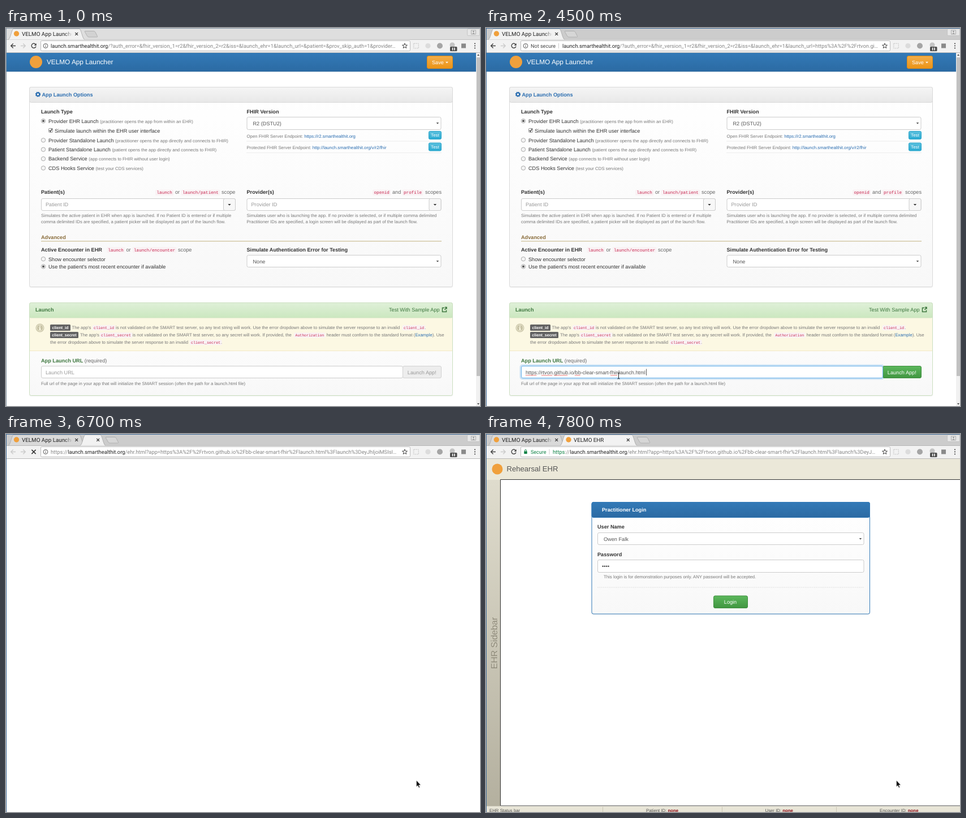
Write an HTML page that moves like this. It is 838 px wide and 668 px high and loops after 8000 ms.

```html
<!DOCTYPE html>
<html lang="en">
<head>
<meta charset="utf-8">
<title>App launcher walkthrough</title>
<style>
html, body { margin: 0; width: 100%; height: 100%; overflow: hidden; background: #fff; }
svg { display: block; }
text { font: 9.17px "Liberation Sans", sans-serif; fill: #333; white-space: pre; text-rendering: geometricPrecision; }
.b { font-weight: bold; }
.s { font-size: 7.8px; fill: #777; }
.hint { fill: #999; }
.field { fill: #555; }
.soft { fill: #666; }
.w { fill: #fff; }
.link { fill: #2a6db0; }
.green { fill: #3c763d; }
.code { font-family: "Liberation Mono", monospace; fill: #c7254e; }
.ui { font: 9.8px Roboto, sans-serif; fill: #222; }
.url { font: 9.3px Roboto, sans-serif; fill: #858585; }
.host { fill: #222; }
.safe { fill: #0b8043; }
.mid { text-anchor: middle; }
</style>
</head>
<body>
<svg id="stage" width="838" height="668" viewBox="0 0 838 668"></svg>
<script>
const LOOP = 8000, STEP = 100;
const BRAND = 'VELMO App Launcher', EHR_TITLE = 'VELMO EHR', LOGO = '#f0a03c';
const USER = 'rtvon', PROJECT = 'bb-clear-smart-fhir';
const HOST = 'launch.smarthealthit.org';

const rect = (x, y, w, h, fill, more = '') =>
  `<rect x="${x}" y="${y}" width="${w}" height="${h}" fill="${fill}" ${more}/>`;
const circle = (x, y, r, fill, more = '') => `<circle cx="${x}" cy="${y}" r="${r}" fill="${fill}" ${more}/>`;
const path = (d, fill, more = '') => `<path d="${d}" fill="${fill}" ${more}/>`;
const line = (d, color, width = 1, more = '') => path(d, 'none', `stroke="${color}" stroke-width="${width}" ${more}`);
const text = (x, y, s, cls = '', more = '') => `<text x="${x}" y="${y}" class="${cls}" ${more}>${s}</text>`;
const span = (cls, s) => `<tspan class="${cls}">${s}</tspan>`;
const group = (s, more) => `<g ${more}>${s}</g>`;
const bordered = (x, y, w, h, fill, stroke, r = 2.5) =>
  rect(x + .5, y + .5, w - 1, h - 1, fill, `stroke="${stroke}" rx="${r}"`);
const caret = (x, y, color = '#333', r = 2.7) => path(`M${x - r} ${y - r / 2}h${2 * r}l${-r} ${r}z`, color);
const grad = (id, a, b) =>
  `<linearGradient id="${id}" x2="0" y2="1"><stop stop-color="${a}"/><stop offset="1" stop-color="${b}"/></linearGradient>`;

const DEFS = '<defs>' +
  grad('paper', '#fff', '#f8f8f8') + grad('grey', '#f5f5f5', '#e8e8e8') + grad('blue', '#337ab7', '#2b6aa3') +
  grad('orange', '#f3ae4a', '#eb9316') + grad('cyan', '#5bc0de', '#2aabd2') + grad('mint', '#dff0d8', '#cbe7bf') +
  grad('leaf', '#5cb85c', '#419641') + grad('sand', '#dfdccd', '#b4b09f') +
  `<linearGradient id="fade" gradientUnits="userSpaceOnUse" x1="104" x2="117">
   <stop stop-color="#222"/><stop offset="1" stop-color="#222" stop-opacity="0"/></linearGradient></defs>`;

function code(x, y, s, size = 7.62) {
  return rect(x - 2.3, y - size, s.length * size * .6 + 4.6, size * 1.35, '#f9f2f4', 'rx="1.5"') +
    text(x, y, s, 'code', `style="font-size:${size}px"`);
}

function select(x, y, w, h, value) {
  return bordered(x, y, w, h, '#fff', '#ccc') + text(x + 11, y + 14.5, value, 'field') + caret(x + w - 6.5, y + 11.3, '#333', 2.3);
}

function panel(x, y, w, h, head, border) {
  return rect(x, y + 1, w, h, '#000', 'rx="3" opacity=".05"') + bordered(x, y, w, h, 'url(#paper)', border, 3) +
    bordered(x, y, w, 28, head, border, 3);
}

function radio(y, label, note, on) {
  return circle(66, y, 3.7, '#f4f4f4', 'stroke="#999" stroke-width=".8"') + (on ? circle(66, y, 2, '#555') : '') +
    text(75, y + 3.3, label + (note ? ' ' + span('s', `(${note})`) : ''));
}

function combo(x, hint, help) {
  return bordered(x, 301, 344, 22, '#fff', '#ccc') + bordered(x + 322, 301, 22, 22, '#f7f7f7', '#ccc') +
    caret(x + 333, 312.3) + text(x + 8, 315, hint, 'hint') + text(x, 334, help[0], 's') + text(x, 345, help[1], 's');
}

function endpoint(y, label, url) {
  return text(425.5, y, `${label} FHIR Server Endpoint: ` + span('link', url), 's') +
    bordered(747, y - 11.5, 23, 15, 'url(#cyan)', '#28a4c9', 2) + text(758.5, y - 1.3, 'Test', 's w mid') +
    line(`M425 ${y + 6.5}H770`, '#ececec');
}

function badge(x, y, w, s) {
  return rect(x, y - 8, w, 11, '#636363', 'rx="1.5"') +
    text(x + w / 2, y - .2, s, 's w b mid', 'style="font-size:7.1px"');
}

const PAGE = rect(0, 44, 831, 33, 'url(#blue)') + rect(0, 77, 831, 1, '#d5dde5') +
  circle(53, 60, 11, LOGO) + text(72, 64, BRAND, 'w', 'style="font-size:11.8px"') +
  bordered(744, 49, 46, 23, 'url(#orange)', '#e38d13') + text(753, 64, 'Save', 'w') + caret(779.5, 61, '#fff', 2.4) +
  rect(831, 44, 7, 624, '#f1f1f1') + rect(832, 52, 6, 563, '#c1c1c1') +
  path('M833 49h4l-2-3zM833 663h4l-2 3z', '#555') +

  panel(41, 104, 749, 354, 'url(#grey)', '#d9d9d9') +
  circle(56.5, 117.3, 2.8, 'none', 'stroke="#2a6db0" stroke-width="2"') +
  circle(56.5, 117.3, 4, 'none', 'stroke="#2a6db0" stroke-width="1.4" stroke-dasharray="1.7 1.44"') +
  text(63.5, 121, 'App Launch Options', 'b link') +
  text(62, 151, 'Launch Type', 'b') +
  radio(164.3, 'Provider EHR Launch', 'practitioner opens the app from within an EHR', true) +
  bordered(75, 177, 8, 8, '#f4f4f4', '#999', 1) + line('M76.7 181l1.8 2 3-5', '#444', 1.4) +
  text(86, 184.8, 'Simulate launch within the EHR user interface') +
  radio(198.3, 'Provider Standalone Launch', 'practitioner opens the app directly and connects to FHIR') +
  radio(214.7, 'Patient Standalone Launch', 'patient opens the app directly and connects to FHIR') +
  radio(231.1, 'Backend Service', 'app connects to FHIR without user login') +
  radio(247.5, 'CDS Hooks Service', 'test your CDS services') +
  text(425.5, 151, 'FHIR Version', 'b') + select(425.5, 157, 344, 23, 'R2 (DSTU2)') +
  endpoint(193.5, 'Open', 'https://r2.smarthealthit.org') +
  endpoint(214, 'Protected', 'http://launch.smarthealthit.org/v/r2/fhir') +

  text(62, 293.3, 'Patient(s)', 'b') + code(266.5, 293.3, 'launch') + text(299, 293.3, 'or', 'soft') +
  code(312, 293.3, 'launch/patient') + text(381, 293.3, 'scope', 'soft') +
  combo(62, 'Patient ID', ['Simulates the active patient in EHR when app is launched. If no Patient ID is entered or if multiple',
    'comma delimited IDs are specified, a patient picker will be displayed as part of the launch flow.']) +
  text(425.5, 293.3, 'Provider(s)', 'b') + code(650.5, 293.3, 'openid') + text(683, 293.3, 'and', 'soft') +
  code(703, 293.3, 'profile') + text(741, 293.3, 'scopes', 'soft') +
  combo(425.5, 'Provider ID', ['Simulates user who is launching the app. If no provider is selected, or if multiple comma delimited',
    'Practitioner IDs are specified, a login screen will be displayed as part of the launch flow.']) +

  text(62, 373.3, 'Advanced', 'b', 'style="fill:#8a6d3b"') + line('M62 376.8H770', '#c2b280') +
  text(62, 394.5, 'Active Encounter in EHR', 'b') + code(180.5, 394.5, 'launch') + text(212.5, 394.5, 'or', 'soft') +
  code(226, 394.5, 'launch/encounter') + text(304, 394.5, 'scope', 'soft') +
  radio(408.2, 'Show encounter selector') +
  radio(421.5, "Use the patient's most recent encounter if available", '', true) +
  text(425.5, 394.5, 'Simulate Authentication Error for Testing', 'b') + select(425.5, 401, 344, 22, 'None') +

  panel(41, 485, 749, 165, 'url(#mint)', '#cbdfc0') + text(52, 501, 'Launch', 'b green') +
  text(677, 501, 'Test With Sample App', 'green') +
  line('M775 494.5h-3.5v7h7v-3M775.5 498l3.2-4M775.8 493.5h3.2v3.2', '#3c763d', 1.5) +
  rect(42, 512.5, 747, 58, '#fcf8e3') + line('M42 570.5H789', '#f3e9c6') +
  circle(60, 530, 7.5, '#c9c4a7') + circle(60, 530, 5.8, 'none', 'stroke="#fcf8e3" stroke-width=".8"') +
  path('M59 526h2v1.7h-2zM58 529h3v4h1v1h-4v-1h1v-3h-1z', '#fcf8e3') +
  badge(78, 532, 36, 'client_id') + text(116.5, 532, "The app's", 's') + code(155, 532, 'client_id', 6.7) +
  text(194, 532, 'is not validated on the SMART test server, so any text string will work. Use the error dropdown above to simulate the server response to an invalid', 's') +
  code(703, 532, 'client_id', 6.7) + text(740, 532, '.', 's') +
  badge(78, 545, 50, 'client_secret') + text(131, 545, "The app's", 's') + code(168, 545, 'client_secret', 6.8) +
  text(223.5, 545, 'is not validated on the SMART test server, so any secret will work. If provided, the', 's') +
  code(511.5, 545, 'Authorization', 6.5) +
  text(566.5, 545, `header must conform to the standard format (${span('link', 'Example')}). Use`, 's') +
  text(78, 558, 'the error dropdown above to simulate the server response to an invalid', 's') +
  code(327, 558, 'client_secret', 6.7) + text(380, 558, '.', 's') +
  text(62, 590.5, 'App Launch URL ' + '<tspan style="font-weight:normal;fill:#666">(required)</tspan>', 'b green') +
  text(62, 631, 'Full url of the page in your app that will initialize the SMART session (often the path for a launch.html file)', 's');

function squiggle(from, to) {
  return line(`M${from} 613.2` + 'l1.2 1.4l1.2 -1.4'.repeat(Math.round((to - from) / 2.4)), '#e8403a', .7);
}

function launchForm(t) {
  if (t < 4500) {
    return bordered(62, 597, 640, 22, '#fff', '#ccc') + text(70, 611.5, 'Launch URL', 'hint') +
      bordered(701, 597, 69, 22, '#ededed', '#d2d2d2') + text(735.3, 611.5, 'Launch App!', 'mid hint');
  }
  const caretOn = t < 5000 || (t >= 5600 && t < 6100);
  return rect(61, 596, 642, 24, 'none', 'rx="3.5" stroke="#66afe9" stroke-width="3" opacity=".3"') +
    bordered(701, 597, 69, 22, t >= 6200 ? '#419641' : 'url(#leaf)', '#3e8f3e') + text(735.3, 611.5, 'Launch App!', 'mid w') +
    bordered(62, 597, 640, 22, '#fff', '#66afe9') +
    text(70, 611.5, `https://${USER}.github.io/${PROJECT}/launch.html`, 'field') +
    [[70, 90], [98, 118], [120, 145], [157, 167], [220, 232]].map(w => squiggle(...w)).join('') +
    (caretOn ? line('M283.5 602.5V614', '#333', .8) : '');
}

function statusBubble(t) {
  if (t < 6300) return '';
  return group(bordered(-2, 655, 282, 16, '#f2f2f2', '#c4c4c4') +
    text(3, 666.5, `https://${HOST}/ehr.html?app=https%3A%2F…`, 'ui', 'style="fill:#666"'), `opacity="${t < 6500 ? .7 : 1}"`);
}

function ehrPage(t) {
  const idAlpha = t < 7300 ? .08 : t < 7400 ? .4 : t < 7600 ? .7 : 1;
  const loginAlpha = t < 7300 ? 0 : t < 7400 ? .25 : t < 7600 ? .5 : t < 7800 ? .8 : 1;
  const ids = [[283, 'Patient'], [493.5, 'User'], [696, 'Encounter']].map(([x, name]) =>
    text(x, 667.7, `${name} ID: <tspan class="b" style="fill:#8b0a14">none</tspan>`, 's', 'style="fill:#555"')).join('');
  const dots = [0, 1, 2, 3].map(i => circle(206.6 + i * 3.3, 233.7, 1.25, '#444')).join('');
  const login = panel(186.5, 120, 492.5, 198.5, 'url(#blue)', '#337ab7') +
    text(205, 137, 'Practitioner Login', 'b w') +
    text(197, 167, 'User Name', 'b') + select(197, 174, 471.5, 22, 'Owen Falk') +
    text(197, 215.7, 'Password', 'b') + bordered(197, 222, 471.5, 23, '#fff', '#ccc') + dots +
    text(208, 255, 'This login is for demonstration purposes only. ANY password will be accepted.', 's') +
    line('M197 271H668', '#ddd', 1, 'stroke-dasharray="2 1.3"') +
    bordered(402, 285.5, 61, 22.5, 'url(#leaf)', '#3e8f3e') + text(432, 300, 'Login', 'w mid');
  return rect(0, 44, 838, 37, '#ebe8d9') + circle(20, 62, 9.5, LOGO) +
    text(36.5, 66.3, 'Rehearsal EHR', 'field', 'style="font-size:13.1px"') +
    rect(0, 81, 25, 577, 'url(#sand)') + rect(25, 80, 813, 577.5, '#fff') +
    line('M838 80.5H25.5V657H838', '#333') +
    group(text(0, 1, 'EHR Sidebar', 'mid', 'style="font-size:15.7px;fill:#d8d4c4"') +
      text(0, 0, 'EHR Sidebar', 'mid', 'style="font-size:15.7px;fill:#8d8979"'), 'transform="translate(19.5 369.5) rotate(-90)"') +
    rect(0, 657.7, 838, 11, '#e8e5d7') + line('M206.5 659V668M417.5 659V668M619.5 659V668', '#cbc7b6') +
    text(6, 667.7, 'EHR Status bar', 's', 'style="fill:#555"') + group(ids, `opacity="${idAlpha}"`) +
    group(login, `opacity="${loginAlpha}"`);
}

const tab = (x, end, fill) => path(`M${x} 20.5C${x + 4} 19 ${x + 6} 2 ${x + 9} 1.5H${end - 9}C${end - 6} 2 ${end - 4} 19 ${end} 20.5`,
  fill, 'stroke="#a5a5a5" stroke-width=".8"');
const cross = (x, y, r, width) => line(`M${x - r} ${y - r}l${2 * r} ${2 * r}m0 ${-2 * r}l${-2 * r} ${2 * r}`, '#333', width);

function addressBar(t) {
  const esc = s => s.replace(/&/g, '&amp;');
  const host = span('host', HOST);
  const query = '/?auth_error=&fhir_version_1=r2&fhir_version_2=r2&iss=&launch_ehr=1&launch_url=';
  const app = `/ehr.html?app=https%3A%2F%2F${USER}.github.io%2F${PROJECT}%2Flaunch.html%3Flaunch%3DeyJ`;
  const info = circle(70, 31.5, 3.9, 'none', 'stroke="#555"') + rect(69.5, 31, 1, 2.6, '#555') + rect(69.5, 29.1, 1, 1, '#555');
  const divider = x => line(`M${x} 27V36`, '#ccc');
  if (t < 4500) return info + text(79, 34.7, host + esc(query + '&patient=&prov_skip_auth=1&provider…'), 'url');
  if (t < 6700) {
    return info + text(79, 34.7, 'Not secure', 'url', 'style="fill:#444;font-size:9.1px"') + divider(128.5) +
      text(135, 34.7, host + esc(query) + `https%3A%2F%2F${USER}.gi…`, 'url');
  }
  if (t < 6900) return info + text(79, 34.7, 'https://' + host + app + 'hIjoiMSIsI…', 'url');
  return rect(67.3, 30.5, 5.4, 4.5, '#0b8043', 'rx=".6"') + line('M68.4 31v-1.6a1.6 1.6 0 0 1 3.2 0V31', '#0b8043') +
    text(79, 34.7, 'Secure', 'url safe', 'style="font-size:9px"') + divider(112) +
    text(118, 34.7, span('safe', 'https') + '://' + host + app + '…', 'url');
}

function browser(t) {
  const focused = t >= 4500, second = t >= 6700, wide = t >= 6900;
  const loading = second && t < 7800, end = !second ? 139 : wide ? 267 : 176;
  const star = Array.from({ length: 10 }, (_, i) => {
    const a = i * Math.PI / 5, r = i % 2 ? 2 : 4.7;
    return `${705 + r * Math.sin(a)},${31.7 - r * Math.cos(a)}`;
  }).join(' ');
  const strip = focused ? '#cccccc' : '#dedede', edge = focused ? '#3f6b98' : '#8796a5';
  const icon = (x) => circle(x, 10, 4.7, LOGO);
  const plus = end + 8;
  let s = rect(0, 0, 838, 20.5, strip) + rect(0, 20.5, 838, 23, '#f2f2f2') +
    path(`M${plus - 7} 5.5h15q2 0 3 2l3.5 7q.8 1.5-1 1.5h-14q-2 0-3-2l-4-7q-.8-1.5.5-1.5z`, focused ? '#d6d6d6' : '#d2d2d2', 'stroke="#a8a8a8" stroke-width=".8"') +
    line('M0 20.5H838', '#b5b5b5', .8) +
    tab(4, 139, second ? '#d9d9d9' : '#f2f2f2') + icon(18.5) + cross(124.7, 10.5, 2.4, 1.3) +
    text(28, 14, BRAND.slice(0, -1), 'ui', 'style="fill:url(#fade)"');
  if (second) s += line('M0 20.5H838', '#b5b5b5', .8) + tab(131, end, '#f2f2f2') + cross(wide ? 251.3 : 162.7, 10.5, 2.4, 1.3);
  if (wide) {
    s += text(155, 14, EHR_TITLE, 'ui') + (t < 7400
      ? line('M146 6.3a4.2 4.2 0 1 1-4.2 4.2', '#4a8af4', 1.4, `transform="rotate(${160 + (t - 7100) * .36} 146 10.5)"`)
      : icon(146));
  }
  s += line('M17 31.5H8.7M12.7 27.5l-4 4l4 4', loading ? '#ccc' : '#444', 1.4) +
    line('M26 31.5h8.3M30.3 27.5l4 4l-4 4', '#ccc', 1.4) +
    (loading ? cross(49, 31.5, 3.6, 1.5)
      : line('M52.2 28.7A4 4 0 1 0 53 32.5', '#444', 1.4) + path('M53.7 27v4h-4z', '#444')) +
    bordered(61, 22, 654, 19, '#fff', '#bcbcbc', 2) + addressBar(t) +
    `<polygon points="${star}" fill="none" stroke="#444"/>` +
    rect(720.8, 27.3, 8.5, 8.5, 'none', 'stroke="#c8c8c8" stroke-dasharray="2.5 1"') + circle(746, 31.5, 4.6, '#dcdcdc') +
    circle(767, 31.5, 5, '#a5a5a5') + circle(789, 30, 4.5, '#c4c4c4') + rect(785, 33, 12.5, 8, '#4d4d4d', 'rx="1.5"') +
    rect(788.8, 34.6, 1.6, 4.8, '#fff') + rect(792.2, 34.6, 1.6, 4.8, '#fff') + rect(805, 27.5, 8, 8, '#8a8a8a') +
    [27.5, 31.5, 35.5].map(y => circle(829, y, 1.1, '#444')).join('') +
    rect(815.5, 1.5, 22, 12, '#e6e6e6', 'rx="2" stroke="#bbb" stroke-width=".7"') +
    rect(822.5, 4, 8, 7, 'none', 'stroke="#999" stroke-width=".7"') + circle(826.5, 6.3, 1.3, '#999') + path('M824 10.5q2.5-4 5 0z', '#999') +
    rect(0, 43, 838, 1, '#b9b9b9') + rect(0, 0, 838, 1, edge) + rect(0, 0, 1, 668, edge);
  return s;
}

// time, x, y, ease-out power of the way there
const WAY = [[700, 84, 0, 1], [1500, 203, 510, 1.2], [2000, 230, 620, 1.8], [2200, 230.5, 620, 1], [2400, 231.5, 620, 1],
  [4400, 231.5, 620, 1], [4500, 234.5, 614.5, 1], [4800, 234.5, 614.5, 1], [5400, 667, 575, 1.5], [5600, 667, 577, 1],
  [5700, 667, 577, 1], [5900, 692, 597, 1], [6000, 692, 597, 1], [6300, 727, 611, 1], [6600, 727, 611, 1], [6700, 725.5, 612, 1]];

function pointer(t) {
  if (t < WAY[0][0]) return '';
  const i = WAY.findIndex(p => p[0] > t);
  let [, x, y] = WAY[WAY.length - 1];
  if (i > 0) {
    const [t0, x0, y0] = WAY[i - 1], [t1, x1, y1, power] = WAY[i];
    const u = 1 - (1 - (t - t0) / (t1 - t0)) ** power;
    x = x0 + (x1 - x0) * u;
    y = y0 + (y1 - y0) * u;
  }
  const onForm = t < 6700 && y > 598 && y < 619;
  let shape = path('M0 0V11.6L2.6 9.2L4.4 13.2L6.2 12.4L4.5 8.5H8z', '#111', 'stroke="#fff" stroke-width=".6"');
  if (onForm && x > 62 && x < 701) shape = line('M-2-5.5q2 0 2 1.2q0-1.2 2-1.2M0-4.5V4.5M-2 5.5q2 0 2-1.2q0 1.2 2 1.2', '#222', 1);
  if (onForm && x >= 701) {
    shape = path('M-1 1q1-1.6 2 0v3.2l4 .9q1.2.4 1 1.7l-.7 4h-5L-2.3 7q-.6-1.2 1.3-.7z', '#111', 'stroke="#fff" stroke-width=".5"');
  }
  return group(shape, `transform="translate(${x} ${y})"`);
}

function scene(t) {
  const page = t < 6700 ? PAGE + launchForm(t) + statusBubble(t) : t < 7100 ? '' : ehrPage(t);
  return DEFS + rect(0, 0, 838, 668, '#fff') + page + browser(t) + pointer(t);
}

const stage = document.getElementById('stage');
let shown = -1;
function play() {
  const tick = Math.floor(performance.now() % LOOP / STEP) * STEP;
  if (tick !== shown) stage.innerHTML = scene(shown = tick);
  requestAnimationFrame(play);
}
play();
</script>
</body>
</html>
```
